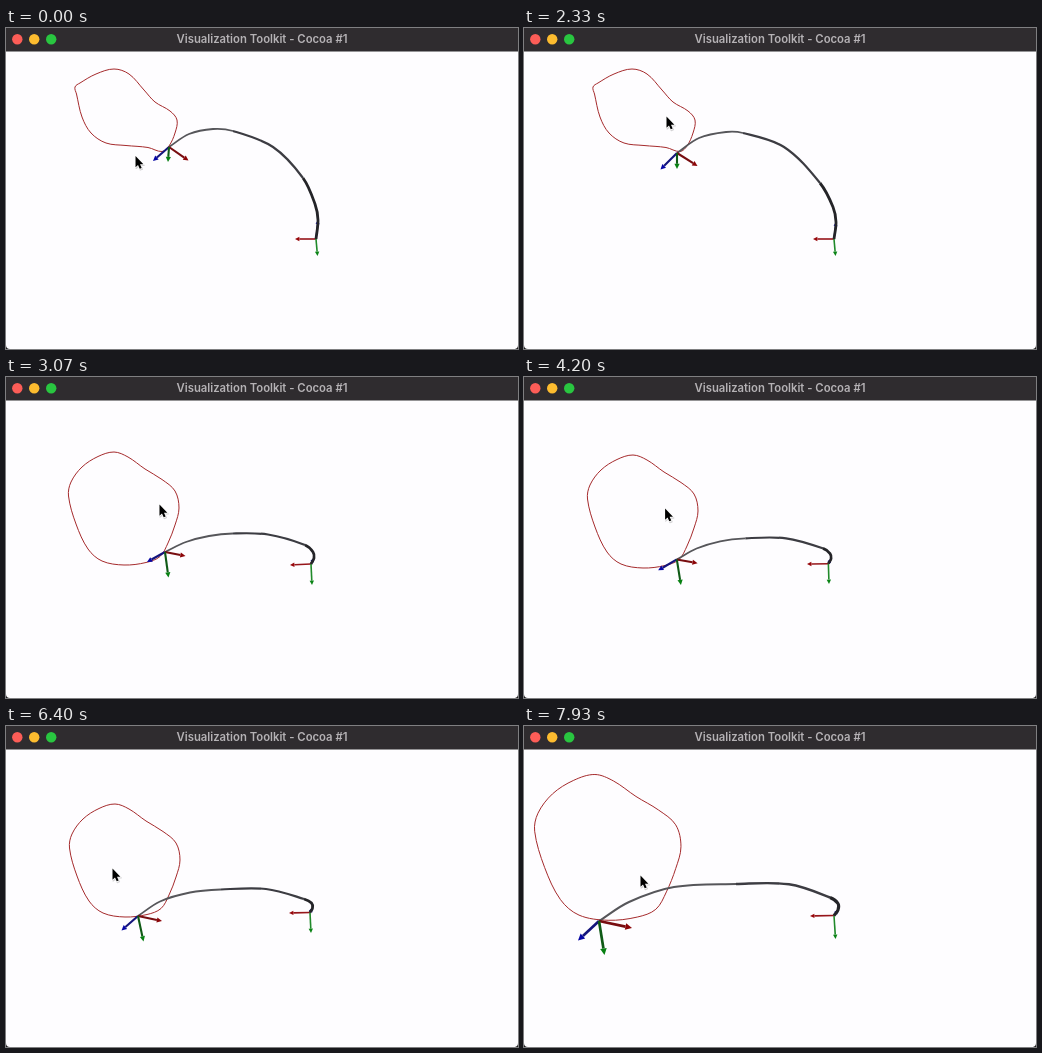
An HTML page that plays this animation: 512 px wide and 321 px high, repeating every 8 s.

```html
<!DOCTYPE html>
<html lang="en">
<head>
<meta charset="utf-8">
<title>Continuum arm</title>
<style>
  html, body { margin: 0; width: 100%; height: 100%; overflow: hidden; background: #1b191b; }
  svg { display: block; width: 100vw; height: 100vh; }
  text { font: 600 11.3px Inter, sans-serif; fill: #b5b2b5; text-anchor: middle; }
  path { fill: none; stroke-linejoin: round; }
</style>
</head>
<body>
<svg viewBox="0 0 512 321">
  <rect width="512" height="321" rx="4" fill="#fefdff"/>
  <path d="M0 0H512V23.5H0Z" style="fill:#2f2c2f"/>
  <circle cx="11.3" cy="11.3" r="5.2" fill="#fc5d57"/>
  <circle cx="28.2" cy="11.3" r="5.2" fill="#fdbc2f"/>
  <circle cx="45.2" cy="11.3" r="5.2" fill="#29c640"/>
  <text x="256" y="15">Visualization Toolkit - Cocoa #1</text>
  <g id="scene"></g>
  <g id="cursor">
    <path d="M.6 1V12.4L3.1 10.2 4.8 14 6.9 13.2 5.2 9.4H8.6Z" style="fill:#000;opacity:.16" stroke="#000" stroke-width="1.4"/>
    <path d="M0 0V11.3L2.5 9 4.2 12.8 6.2 12 4.5 8.2H7.9Z" style="fill:#000" stroke="#fff" stroke-width="1.5" paint-order="stroke"/>
  </g>
</svg>
<script>
const LOOP_MS = 8000;
const scene = document.getElementById('scene');
const cursor = document.getElementById('cursor');

const parse = s => s.split(' ').map(p => p.split(',').map(Number));
const mix = (a, b, k) => a.map((p, i) => p.map((v, j) => v + (b[i][j] - v) * k));

// Target curve in the three camera views
const loopTop = parse('108,41 90,46 74,55 69,59 70.5,66 76,89 85,105 100,115 120,117.5 ' +
  '142,119.5 156,123.5 163,118 169,105 171,92 164,83 149,74 138,62 123,46');
const loopTurn = parse('108,75 92,79.5 76,90 65,105 62.5,119 70,147 82,172 96,184 118,188 ' +
  '140,185.5 154,179.5 162,166 169,148 173,131 169,114 156,102.5 139,92 122,80');
const loopLow = loopTurn.map(([x, y]) => [x + 1, y + 3]);
const loopNear = loopLow.map(([x, y]) => [10 + (x - 63) * 1.324, 48.5 + (y - 78) * 1.29]);

// Points: cursor, scale, arm (tip to base), tip axes r g b, base axes r g, loop
const SIZE = 1, ARM = 2, TIP = 11, BASE = 14, CURVE = 16;
const pose = (cur, arm, tip, base, loop, size = 1) =>
  [...parse(cur), [size, 0], ...parse(arm), ...parse(tip), ...parse(base), ...loop];

const baseTop = '289,211 311.5,228';
const start = pose('129.5,128',
  '163,119 183,106 207,101 227,103 267,119 297,150 309,176 312,192 310,211',
  '182.5,132.5 162,134 147,133', baseTop, loopTop);
const drift = pose('146.5,90.5',
  '158,124 180,109.5 204,103.5 223,105 264,119.5 297,152 309,176 312,192 310,211',
  '178.5,136.5 158,139 142,139.5', baseTop, loopTop);
const before = pose('142.5,88.5',
  '153,125 175,110 202,104 219,105 260,119 296,155 309,179 312,194 310,211',
  '173.5,138 153,141 136.5,141.5', baseTop, loopTop);
const turned = pose('153.5,127.5',
  '159,175 180,165 203,159 227,156.5 262,157.5 299,168 307,175 308,181 305,187',
  '179.5,179 162.5,200.5 141,185', '284,188 306,208', loopTurn);
const low = pose('133.5,134',
  '149,187 168,175.5 192,167.5 218,164.3 262,163.7 299,173.5 305.5,177.5 306.5,182 304,186.5',
  '170,190.5 153.5,212.5 130,198.5', '283,187 305,207', loopLow);
const left = pose('106.5,142.5',
  '132,190 154,175.5 184,166.5 215,163.5 260,163 298,173 305.5,177 306.5,182 304,186.5',
  '156,195 137.5,215.5 115.5,204.5', '283,187 305,207', loopLow);
const near = pose('116.5,149.5',
  '75,195 105,176 150,161 212,158 265,158.3 306,171.5 314,177.5 314,184 310,189.5',
  '108,202 80.5,229 54,214.5', '286,190 311.5,213', loopNear, 1.28);

const settled = mix(turned, low, .35).map((p, i) => i >= BASE ? low[i] : p);

// Closest view, with the tip moved right by dx
const closest = (dx, k) => near.map(([x, y], i) => {
  if (i === 0) return mix([left[0]], [near[0]], k)[0];
  if (i === SIZE) return [x, y];
  const share = i < TIP ? Math.max(0, 1 - (i - ARM) / 4) : i < BASE ? 1 : 0;
  return [200 + (x + dx * share - 200) * 1.03, 90 + (y - 90) * 1.015];
});

const keys = [
  [0, start], [1130, drift], [2330, before], [2530, before],
  [3070, turned], [3400, settled], [5330, low], [6400, left], [6500, left],
  [6850, closest(18, .3)], [7830, closest(1, .93)], [7930, near]
];

function poseAt(t) {
  const i = keys.findIndex(([time]) => time > t);
  if (i < 0) return near;
  const [t0, a] = keys[i - 1], [t1, b] = keys[i];
  return mix(a, b, (t - t0) / (t1 - t0));
}

const fix = v => v.toFixed(2);

// Smooth curve pieces through the points, one per span
function spans(pts, closed) {
  const n = pts.length;
  const at = i => closed ? pts[(i + n) % n] : pts[Math.max(0, Math.min(n - 1, i))];
  const dir = i => {
    const [ax, ay] = at(i - 1), [bx, by] = at(i + 1);
    const len = Math.hypot(bx - ax, by - ay) || 1;
    return [(bx - ax) / len, (by - ay) / len];
  };
  return Array.from({ length: closed ? n : n - 1 }, (_, i) => {
    const [ax, ay] = at(i), [bx, by] = at(i + 1);
    const h = Math.hypot(bx - ax, by - ay) / 3;
    const [ux, uy] = dir(i), [vx, vy] = dir(i + 1);
    return 'C' + [ax + ux * h, ay + uy * h, bx - vx * h, by - vy * h, bx, by].map(fix).join(' ');
  });
}

const stroke = (d, color, width) => `<path d="${d}" stroke="${color}" stroke-width="${fix(width)}"/>`;

function arrow([x, y], [ex, ey], [shaft, head], width, half) {
  const len = Math.hypot(ex - x, ey - y) || 1;
  const ux = (ex - x) / len, uy = (ey - y) / len;
  const h = Math.min(len, half * 2);
  const bx = ex - ux * h, by = ey - uy * h;
  const corner = s => `${fix(bx - uy * half * s)} ${fix(by + ux * half * s)}`;
  return stroke(`M${fix(x)} ${fix(y)}L${fix(bx)} ${fix(by)}`, shaft, width) +
    `<path d="M${fix(ex)} ${fix(ey)}L${corner(1)} ${corner(-1)}Z" style="fill:${head}"/>`;
}

const RED = ['#780d10', '#8c0508'], GREEN = ['#0f5a16', '#078012'], BLUE = ['#14147c', '#0606a4'];
const BASE_RED = ['#96151a', '#98080c'], BASE_GREEN = ['#218a2b', '#0b8416'];
const SECTIONS = [[0, 3, '#56565a', 1.8], [3, 5, '#3c3c42', 2.2], [5, 8, '#242428', 2.8]];

function draw(t) {
  const p = poseAt(t);
  const size = p[SIZE][0];
  const arm = p.slice(ARM, TIP), loop = p.slice(CURVE);
  const tip = arm[0], base = arm[8];
  const pieces = spans(arm, false);
  const move = pt => 'M' + pt.map(fix).join(' ');

  let out = stroke(move(loop[0]) + spans(loop, true).join('') + 'Z', '#a52a2c', 1);
  out += arrow(base, arm[7], BLUE, 1.5, 2);
  out += arrow(base, p[BASE], BASE_RED, 1.6, 2.2);
  out += arrow(base, p[BASE + 1], BASE_GREEN, 1.6, 2.2);
  for (const [from, to, color, width] of SECTIONS)
    out += stroke(move(arm[from]) + pieces.slice(from, to).join(''), color, width * (.65 + .35 * size));
  [BLUE, RED, GREEN].forEach((color, i) => {
    out += arrow(tip, p[TIP + [2, 0, 1][i]], color, 2.1 * size, 2.6 * size);
  });
  scene.innerHTML = out;
  cursor.setAttribute('transform', `translate(${p[0].map(fix)})`);
}

const begin = performance.now();
function tick() {
  draw((performance.now() - begin) % LOOP_MS);
  requestAnimationFrame(tick);
}
tick();
</script>
</body>
</html>
```
